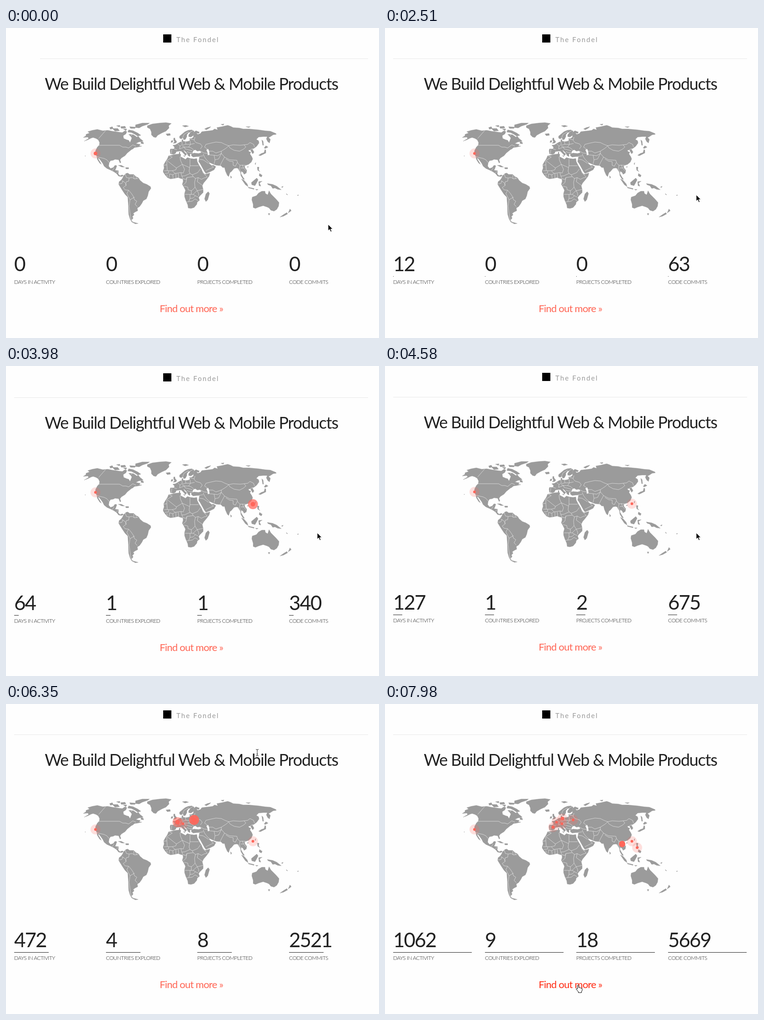
These frames come from a looping animation (821x682 px, 8 s). An HTML page:

```html
<!DOCTYPE html>
<html lang="en">
<head>
<meta charset="utf-8">
<title>We Build Delightful Web &amp; Mobile Products</title>
<style>
  html, body { margin: 0; width: 100%; height: 100%; overflow: hidden; background: #fefefe; }
  svg { display: block; width: 100%; height: 100%; }
  text { font-family: Lato, "Open Sans", sans-serif; fill: #222; }
  .brand { font-size: 15px; letter-spacing: 2.1px; fill: #999; }
  .title { font-size: 36px; letter-spacing: -1.2px; text-anchor: middle; }
  .number { font-size: 44px; letter-spacing: -2px; }
  .label { font-size: 12px; font-weight: 300; letter-spacing: -.55px; }
  .link { font-size: 22px; letter-spacing: -.75px; text-anchor: middle; }
  .land { fill: #9b9b9b; stroke: #9b9b9b; stroke-width: .4; stroke-linejoin: round; }
  .borders { fill: none; stroke: #ececec; stroke-width: .7; stroke-linejoin: round; }
</style>
</head>
<body>
<svg viewBox="0 0 821 682">
  <g id="page">
    <rect x="346" y="14" width="18" height="18"/>
    <text class="brand" x="375" y="31">The Fondel</text>
    <rect id="rule" y="67" height="1" fill="#e8e8e8"/>
    <text class="title" x="408" y="136">We Build Delightful Web &amp; Mobile Products</text>

    <g class="land">
      <!-- North America -->
      <path d="M176 234L184 231 180 228 190 225 201 223 213 226 224 225 234 227 248 229 256 230 262 226 266 228 264 233 258 237 259 243 266 246 270 247 273 252 275 247 277 242 274 238 279 234 284 237 288 240 291 238 295 243 300 247 302 249 292 251 286 254 290 255 296 256 293 259 299 260 290 262 283 263 278 267 264 267 250 260 205 260 206 252 203 246 198 243 192 241 188 242 180 246 172 249 182 243 180 240 170 241 176 237Z"/>
      <path d="M205 258L250 258 258 263 278 266 272 271 267 275 262 281 254 286 251 290 253 296 251 297 248 290 240 289 236 291 230 292 227 297 226 304 230 309 236 307 240 302 244 303 242 309 240 313 248 314 247 321 251 325 256 323 259 325 254 327 248 326 243 320 237 316 231 313 222 309 216 304 213 298 208 291 204 286 203 288 208 296 210 300 206 297 201 289 200 283 197 277 197 270 201 262Z"/>
      <path d="M268 229L270 224 280 226 290 231 297 236 290 238 284 234 276 230ZM234 221L246 221 250 226 240 227ZM228 219L234 217 236 221 230 223ZM285 213L300 209 316 209 312 212 300 216 293 220 285 219ZM272 217L285 218 284 221 274 221ZM252 217L262 216 264 220 254 221ZM243 215L251 214 250 218ZM258 222L266 222 264 226ZM270 234L277 234 274 238ZM297 250L302 251 303 255 297 254ZM247 302L254 302 261 306 255 306ZM263 307L270 307 270 310 264 310ZM174 281h1v1h-1Z"/>
      <path d="M311 215L322 211 338 209 352 208 364 210 358 215 359 220 352 227 343 231 334 236 330 241 325 240 320 235 320 229 317 222 311 219Z"/>
      <!-- South America -->
      <path d="M259 325L264 320 268 319 272 322 281 322 285 326 292 330 295 335 302 341 310 344 318 349 319 353 314 360 312 369 309 376 302 380 299 386 294 393 289 396 290 402 284 405 280 408 282 411 278 415 280 418 276 423 280 427 291 430 285 431 277 427 273 420 270 410 269 385 268 372 262 366 256 357 251 349 248 344 249 338 253 335 256 331Z"/>
      <!-- Africa and Madagascar -->
      <path d="M358 281L364 280 372 278 382 277 385 278 384 283 390 286 395 289 399 285 406 287 414 288 420 287 421 294 425 302 430 310 433 317 438 322 449 319 447 326 441 334 435 341 432 347 434 355 434 362 427 369 424 373 426 379 421 383 420 388 414 395 407 397 401 396 400 389 396 380 393 371 393 364 395 357 391 349 388 344 390 337 389 332 384 331 379 329 370 331 362 332 355 329 350 323 346 317 346 314 348 308 347 301 351 294 355 288ZM440 365L445 360 448 364 444 378 440 382 437 376Z"/>
      <!-- Europe -->
      <path d="M362 277L361 270 362 266 370 266 371 262 367 258 373 257 378 254 383 251 387 250 387 246 389 245 390 249 396 250 402 249 405 247 404 243 408 243 413 240 432 240 432 262 431 275 427 270 421 271 417 268 413 269 411 272 410 276 405 277 405 283 401 281 398 275 393 270 390 268 394 274 398 277 395 281 391 276 386 271 381 271 375 272 373 276 369 278Z"/>
      <path d="M382 242L382 238 388 233 394 228 401 225 409 224 414 227 413 236 407 240 402 239 402 235 406 230 402 230 398 235 398 239 395 245 391 246 390 242 385 244ZM368 254L374 253 376 250 372 245 372 242 369 242 369 247 371 250ZM364 248L367 247 367 251 363 252ZM388 215L396 214 402 216 394 218ZM352 233L361 232 362 236 355 237ZM381 273h2v5h-2ZM390 281l4 0 0 2Z"/>
      <!-- Asia -->
      <path d="M412 243L414 229 418 226 426 229 424 232 419 231 422 234 428 232 431 228 439 227 448 226 455 225 459 222 466 224 464 219 475 217 488 214 494 216 500 219 514 220 522 222 535 222 545 223 556 224 570 226 582 227 594 232 595 234 588 235 582 239 578 241 582 245 580 253 576 250 573 244 575 239 566 239 556 240 551 245 556 248 557 253 552 260 547 264 543 266 538 268 500 276 431 276 425 262Z"/>
      <path d="M436 266L540 264 543 268 546 273 543 277 540 272 538 268 533 268 535 272 539 273 537 277 541 283 543 288 540 295 534 300 528 302 525 304 526 308 530 313 529 319 524 322 522 318 518 315 517 320 521 327 525 333 522 333 517 325 516 318 513 313 511 309 507 308 502 309 496 316 493 318 490 327 487 324 483 315 481 307 477 307 473 303 463 302 457 300 448 296 447 298 452 302 457 302 462 305 458 312 448 317 440 320 437 316 432 307 427 298 424 294 426 283 420 283 412 284 408 281 408 277 414 275 424 276 431 274Z"/>
      <path d="M437 222L443 219 451 217 448 220 441 224ZM473 212L480 211 478 214ZM528 217L538 217 534 219ZM556 280L562 276 568 274 570 267 572 269 572 275 566 278 560 281ZM568 264L572 259 577 262 571 265ZM563 246L566 249 567 258 565 258ZM548 298L550 296 549 301ZM531 305L534 305 532 307ZM494 325L497 328 495 331ZM553 306L557 306 556 312 559 316 554 313ZM558 320L564 324 562 328 557 325Z"/>
      <!-- Indonesia and Oceania -->
      <path d="M518 332L524 335 531 343 533 349 527 345ZM533 350L546 353 546 355 534 352ZM540 340L546 335 552 330 555 334 551 342 548 347 541 345ZM556 338L564 337 558 341 561 348 557 347ZM575 342L581 343 587 344 596 348 606 356 598 355 592 352 587 353 583 347 577 345ZM549 355l6 0 -3 2ZM606 350l4 -2 -1 3ZM617 364l3 3 -2 0ZM641 368l3 -1 -1 2Z"/>
      <path d="M541 378L542 372 551 369 556 363 563 359 570 359 571 364 576 367 579 358 583 365 588 370 594 376 601 384 600 392 596 399 590 403 583 401 579 396 575 394 566 391 556 394 549 397 544 395 544 388ZM577 408L581 408 579 412ZM625 398L628 402 621 407ZM618 406L620 409 611 414 603 416 610 411Z"/>
    </g>
    <path fill="#fefefe" d="M441 268L445 266 447 271 448 279 444 280 444 275Z"/>

    <g class="borders">
      <path d="M205 258H250L257 262 264 262 270 264 279 257 286 260M204 243L219 226M200 283L207 285 216 287 222 290 227 296M234 314L238 308M243 318L248 315"/>
      <path d="M255 336L262 340 265 346 258 351 262 356 270 357 276 364 280 370 283 378 288 381 284 388 289 393M262 320L265 329 271 330 270 337 265 338 263 346M271 330L278 329 283 332 291 331M281 323L282 332M286 326L287 332M270 357L266 364 269 370 273 378 271 392 273 408 275 420 279 427M273 378L283 372M249 343L255 342 258 336"/>
      <path d="M359 281L366 284 354 292 354 301 347 302M356 293L375 308 388 300 384 291 383 283M388 300L404 307 405 303 405 288M405 303H424M404 307L403 315 405 320 410 323 422 318 428 310M375 308L374 312 366 314 348 314M354 301L355 314M366 314L372 320 385 318 390 319 393 311 388 300M385 318L387 326 394 325 405 320"/>
      <path d="M380 329L379 320M374 330V320M368 331L367 323 372 320M359 329L360 321 367 323M350 320L358 319 358 314M355 328L354 322M387 326L390 332 397 333 398 329 412 327 417 331 423 329 430 333 436 330 443 328 437 322 433 318M410 323L412 327M423 329L421 338 432 346M417 331L415 340 416 350 421 358 434 355M398 329L396 340 390 345"/>
      <path d="M392 348L400 350 401 356 408 358 413 354 416 350M394 366H412L418 360 421 358 424 364 424 369M408 358V366M405 366V375L402 382 397 383M405 375L412 374 417 369 412 366M417 369L423 372M402 382L410 381 416 376 423 380"/>
      <path d="M370 266L376 268M378 255L383 260 382 266 393 262M387 250L388 256 383 260M395 250L396 256 388 258M405 248L406 256 396 256M388 260L393 262 402 262 406 256 415 254M402 262L408 264 413 268M393 262L394 266 402 268 410 270M398 272L404 274 410 274M365 267L364 277M388 243L392 234 402 228M404 230L411 226M405 244L414 246"/>
      <path d="M416 240L414 247 418 252 428 255 432 260 428 266M443 266L437 262 440 256 452 253 462 251 474 252 482 256 490 259 500 257 515 258 524 257 532 256 537 252 545 256 547 262M490 259L493 264 502 269 514 271 522 267 528 262 524 257M543 265L538 268M490 259L485 264 474 271 474 276 481 284 492 290 508 291 510 297 515 302 528 302"/>
      <path d="M447 271L455 271 462 275 474 271M448 279L458 280 466 281 474 276 468 288 460 290 458 280M460 290L458 299M471 303L475 295 481 284M484 288L492 293 500 294 500 302 505 304 509 296M515 302L514 309 516 318M520 301L523 308 528 314M517 308H523M434 277L437 284 443 292 448 296M424 283L434 281M426 289L434 290 446 298M440 314L450 309 457 306 452 303M428 271L436 275 444 276"/>
    </g>

    <g id="markers" fill="#ff665a"></g>
    <g id="stats"></g>
    <text id="link" class="link" x="408" y="625">Find out more »</text>
  </g>

  <g id="cursor" stroke-linejoin="round">
    <path id="arrow" d="M0 0V14L3.3 11 5.7 16.5 8.1 15.5 5.7 10.3H10Z" stroke="#fff"/>
    <path id="beam" d="M-3-7H-1L0-6 1-7H3M0-6V6M-3 7H-1L0 6 1 7H3M-1.5 3H1.5" fill="none" stroke="#222"/>
    <path id="hand" d="M-1.5 1Q0-1 1.3 1V6Q3 4.500 4 6.500 6 5.500 6.700 7.500 9 6.500 9 9V12L7.500 15V17H.5V15L-4 9.500Q-4.500 7-1.5 9Z" fill="#fff" stroke="#000"/>
  </g>
</svg>

<script>
const DURATION = 8000, STEP = 147.78;
const $ = id => document.getElementById(id);
const clamp = (v, lo, hi) => Math.min(hi, Math.max(lo, v));

function add(parent, tag, attrs, content = '') {
  const node = document.createElementNS(parent.namespaceURI, tag);
  for (const key in attrs) node.setAttribute(key, attrs[key]);
  node.textContent = content;
  return parent.appendChild(node);
}

// Linear interpolation through [step, ...values] keys.
function track(keys, step) {
  let i = 1;
  while (i < keys.length - 1 && keys[i][0] < step) i++;
  const [a, b] = [keys[i - 1], keys[i]];
  const k = clamp((step - a[0]) / (b[0] - a[0]), 0, 1);
  return a.slice(1).map((v, n) => v + (b[n + 1] - v) * k);
}

const COMMITS = 5669;
const progressKeys = [[0, 0], [5, .6], [17, 63], [27, 391], [31, 675.4], [38, 1566], [47, 3517], [54, COMMITS]]
  .map(([step, commits]) => [step, Math.cbrt(commits / COMMITS)]);
const scrollKeys = [[23, 0], [25, 2], [29, 2], [31, 1], [33, 0]];
const ruleKeys = [[0, 75], [1, 40], [2, 18]];
const cursorKeys = [
  [8, 709, 432], [12, 789, 448], [15, 786, 444], [17, 685, 367], [33, 685, 367], [37, 545, 125],
  [38, 537, 105], [42, 550, 60], [45, 560, 202], [47, 542, 476], [52, 430, 622], [53, 425, 618]
];

const stats = [
  ['DAYS IN ACTIVITY', 1062], ['COUNTRIES EXPLORED', 9], ['PROJECTS COMPLETED', 18], ['CODE COMMITS', COMMITS]
].map(([label, total], i) => {
  const x = Math.round(18 + i * 201.7);
  add($('stats'), 'text', { class: 'label', x, y: 563 }, label);
  return {
    total,
    number: add($('stats'), 'text', { class: 'number', x, y: 535 }),
    line: add($('stats'), 'rect', { x, y: 546, height: 1, fill: '#222' })
  };
});

// Each marker: x, y, step at which it appears.
const markers = [
  [197, 276, -6], [543.5, 302, 23], [389.5, 263.5, 32], [377.5, 260, 39], [414, 255, 41],
  [555, 316, 45], [370, 271, 47], [390.5, 252, 48], [522, 308, 53]
].map(([cx, cy, start]) => ({
  start,
  halo: add($('markers'), 'circle', { cx, cy }),
  dot: add($('markers'), 'circle', { cx, cy })
}));

function drawMarker({ start, halo, dot }, step) {
  const age = Math.max(0, step - start);
  halo.setAttribute('r', Math.min(11, age * 7));
  halo.setAttribute('opacity', clamp(1 - (age - 1.5) * .18, .2, 1));
  dot.setAttribute('r', Math.min(age * 5, clamp(5 - (age - 4) / 2, 3, 5)));
}

function drawCursor(step) {
  const [x, y] = track(cursorKeys, step).map(Math.round);
  const overTitle = x > 89 && x < 727 && y > 98 && y < 148;
  const overLink = x > 339 && x < 476 && y > 604 && y < 632;
  const shape = overLink ? 'hand' : overTitle ? 'beam' : 'arrow';
  for (const id of ['arrow', 'beam', 'hand']) $(id).style.display = id === shape ? '' : 'none';
  $('cursor').setAttribute('transform', `translate(${x} ${y})`);
  $('link').style.fill = overLink ? '#ff2a12' : '#ff6453';
}

function draw(ms) {
  const step = Math.floor((ms + 8) / STEP);
  const progress = track(progressKeys, step)[0] ** 3;
  for (const { total, number, line } of stats) {
    number.textContent = Math.round(total * progress);
    line.setAttribute('width', Math.floor(173 * progress + 1e-6));
  }
  const left = track(ruleKeys, step)[0];
  $('rule').setAttribute('x', left);
  $('rule').setAttribute('width', 797 - left);
  $('page').setAttribute('transform', `translate(0 ${Math.round(track(scrollKeys, step)[0])})`);
  markers.forEach(marker => drawMarker(marker, step));
  drawCursor(step);
}

const begin = performance.now();
function tick() {
  draw((performance.now() - begin) % DURATION);
  requestAnimationFrame(tick);
}
tick();
</script>
</body>
</html>
```
